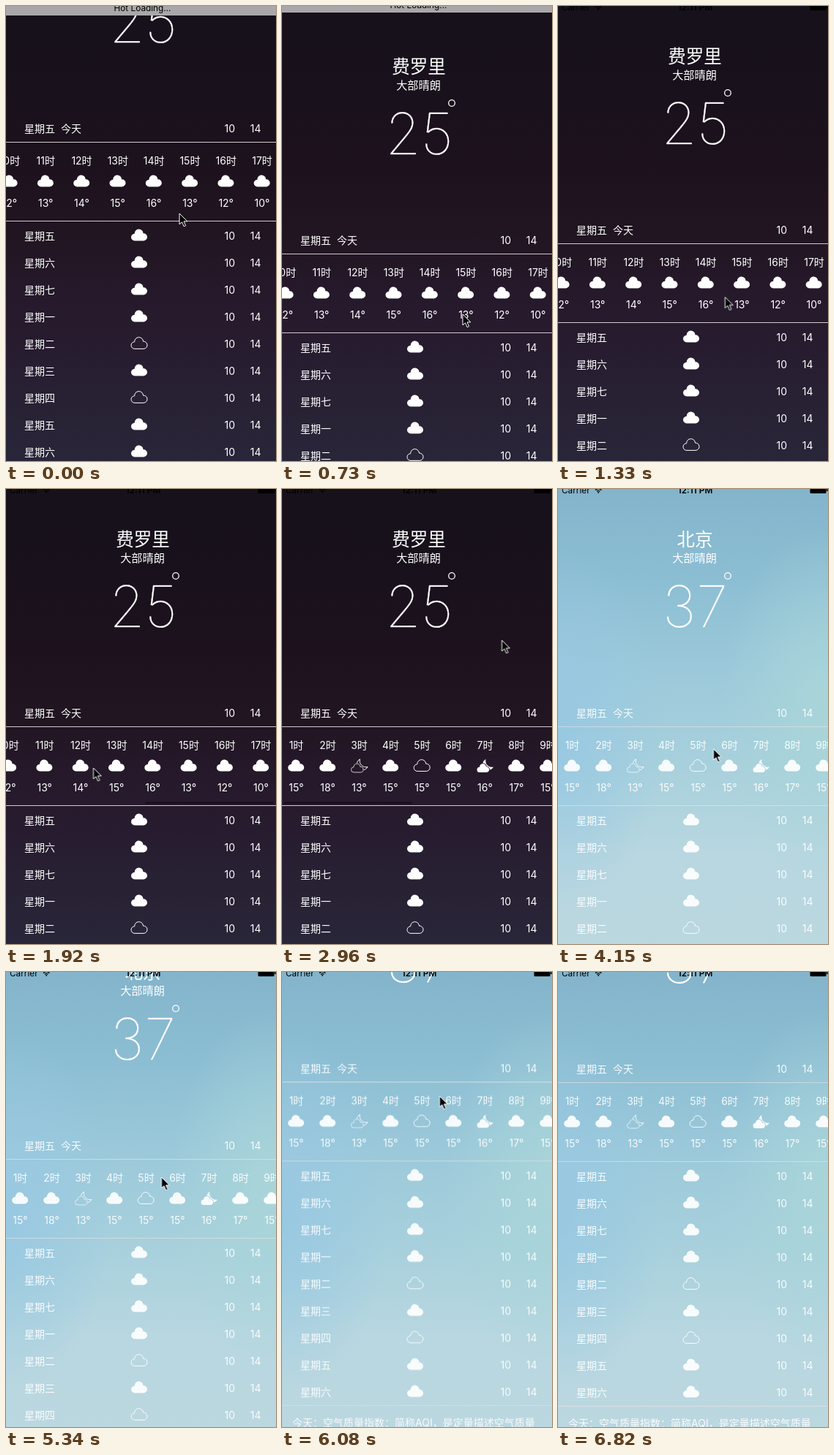
These frames come from a looping animation (369 px wide and 623 px high, 7.13 s). An HTML page:

```html
<!DOCTYPE html>
<html lang="zh-CN">
<head>
<meta charset="utf-8">
<title>天气</title>
<style>
html, body { margin: 0; width: 100%; height: 100%; overflow: hidden; background: #18111b; }
svg { display: block; }
text { font: 14px Inter, "Noto Sans CJK SC", "Noto Sans CJK", sans-serif; fill: #fff; white-space: pre; }
.mid { text-anchor: middle; }
.end { text-anchor: end; }
.city { font-size: 24.5px; }
.sky { font-size: 15.2px; }
.degrees { font-size: 78px; font-weight: 100; letter-spacing: 1px; stroke: #fff; stroke-width: .4px; }
.status text, .banner text { font-size: 11.8px; fill: #000; }
.status .clock { font-weight: 600; }
.line { stroke: #eae4e6; stroke-opacity: .88; }
.light .line { stroke-opacity: .62; }
.light .small { opacity: .92; }
.solid { fill: #fff; }
.outline { fill: none; stroke: #fff; stroke-width: 1; }

/* One animation second is one step of the choppy clock; --step is set by the script. */
.track, .dark .scroll, .light .scroll, .dark .hours, .dark .thumb, .banner, .cursor {
  animation: 48s linear calc(var(--step, 0) * -1s) infinite paused;
}
.track { animation-name: swipe; }
.dark .scroll { animation-name: pull; }
.light .scroll { animation-name: push; }
.dark .hours { animation-name: hours; }
.dark .thumb { animation-name: thumb; }
.banner { animation-name: banner; }
.cursor { animation-name: cursor; }

@keyframes swipe {
  0%, 42.71% { transform: translateX(0); animation-timing-function: ease-in-out; }
  52.08%, 100% { transform: translateX(-369px); }
}
@keyframes pull {
  0% { transform: translateY(-139px); animation-timing-function: cubic-bezier(.35, .2, .6, 1); }
  10.417% { transform: translateY(14px); animation-timing-function: ease-out; }
  16.67%, 100% { transform: translateY(0); }
}
@keyframes push {
  0%, 58.333% { transform: translateY(0); animation-timing-function: ease-in-out; }
  66.67%, 72.92% { transform: translateY(-62px); }
  75% { transform: translateY(-69px); animation-timing-function: ease-in-out; }
  88% { transform: translateY(-184px); animation-timing-function: ease-out; }
  95.83%, 100% { transform: translateY(-174px); }
}
@keyframes hours {
  0%, 25% { transform: translateX(-404.5px); }
  27.083% { transform: translateX(-406px); animation-timing-function: ease-in-out; }
  39.58%, 100% { transform: translateX(0); }
}
@keyframes thumb {
  0%, 22.9% { transform: translateX(190px); opacity: 0; }
  25% { transform: translateX(190px); opacity: 1; }
  27.083% { transform: translateX(190px); opacity: 1; animation-timing-function: ease-in-out; }
  39.58%, 41.67% { transform: translateX(2px); opacity: 1; }
  43.75%, 100% { transform: translateX(2px); opacity: 0; }
}
@keyframes banner {
  0%, 8.333% { transform: translateY(0); }
  10.417% { transform: translateY(-4px); }
  12.5%, 100% { transform: translateY(-22px); }
}
@keyframes cursor {
  0% { transform: translate(237px, 284px); animation-timing-function: ease-in-out; }
  10.417% { transform: translate(247px, 422px); }
  16.67% { transform: translate(238px, 400px); animation-timing-function: ease-in-out; }
  27.083% { transform: translate(119.5px, 382px); animation-timing-function: ease-in-out; }
  35.42% { transform: translate(290px, 374px); animation-timing-function: ease-in-out; }
  41.67% { transform: translate(300.5px, 207px); animation-timing-function: ease-in-out; }
  50% { transform: translate(105px, 215px); }
  52.08%, 54.17% { transform: translate(95px, 218px); }
  58.333% { transform: translate(212.5px, 356px); animation-timing-function: ease-in-out; }
  66.67%, 72.92% { transform: translate(212.5px, 288px); }
  75% { transform: translate(212.5px, 281px); animation-timing-function: ease-in-out; }
  85.4% { transform: translate(215px, 170px); }
  93.75%, 100% { transform: translate(390px, 120px); }
}
</style>
</head>
<body>
<svg id="stage" width="369" height="623" viewBox="0 0 369 623">
  <defs>
    <linearGradient id="night" x2="0" y2="1">
      <stop offset="0" stop-color="#16111b"/>
      <stop offset=".2" stop-color="#19111c"/>
      <stop offset=".38" stop-color="#1d121e"/>
      <stop offset=".5" stop-color="#211521"/>
      <stop offset=".6" stop-color="#241829"/>
      <stop offset=".72" stop-color="#271b2e"/>
      <stop offset=".85" stop-color="#282033"/>
      <stop offset="1" stop-color="#292639"/>
    </linearGradient>
    <linearGradient id="day" x2="0" y2="1">
      <stop offset="0" stop-color="#83b4cb"/>
      <stop offset=".2" stop-color="#8cbed3"/>
      <stop offset=".4" stop-color="#9cc9da"/>
      <stop offset=".6" stop-color="#a7d0dc"/>
      <stop offset=".8" stop-color="#b8d7e0"/>
      <stop offset="1" stop-color="#bbd7e0"/>
    </linearGradient>
    <radialGradient id="blue" cx="0" cy=".53" r=".4">
      <stop offset="0" stop-color="#98c8e2"/>
      <stop offset="1" stop-color="#98c8e2" stop-opacity="0"/>
    </radialGradient>
    <radialGradient id="teal" cx="1" cy=".48" r=".4">
      <stop offset="0" stop-color="#a9d5d9"/>
      <stop offset="1" stop-color="#a9d5d9" stop-opacity="0"/>
    </radialGradient>
    <path id="cloud" d="M-6.4 7.4a4.8 4.8 0 0 1-.2-9.6A5.9 5.9 0 0 1 5.2-2.8 5.1 5.1 0 0 1 6 7.4z"/>
    <path id="crescent" d="M1-9A8.6 8.6 0 0 0 11.5 1.5 7.8 7.8 0 1 1 1-9z"/>
    <use id="puff" href="#cloud" transform="translate(-2.5 3.4) scale(.75)"/>
    <mask id="behind" maskUnits="userSpaceOnUse" x="-15" y="-15" width="30" height="30">
      <rect x="-15" y="-15" width="30" height="30" fill="#fff"/>
      <use href="#puff" fill="#000" stroke="#000" stroke-width="2.4"/>
    </mask>
    <g id="moon"><g mask="url(#behind)"><use href="#crescent"/></g><use href="#puff"/></g>
  </defs>
</svg>
<script>
const text = (x, y, value, cls = '') => `<text x="${x}" y="${y}" class="${cls}">${value}</text>`;
const icon = (x, y, shape, style) => `<use href="#${shape}" x="${x}" y="${y}" class="${style}"/>`;
const line = y => `<path class="line" d="M0 ${y}H369"/>`;
const range = y => text(313, y, 10, 'end') + text(348.5, y, 14, 'end');

const temps = [15, 18, 13, 15, 15, 15, 16, 17, 15, 12, 13, 14, 15, 16, 13, 12, 10];
const icons = { 3: ['moon', 'outline'], 5: ['cloud', 'outline'], 7: ['moon', 'solid'] };

const hour = (temp, i) => {
  const n = i + 1;
  const x = n < 10 ? 19.5 + 43 * i : 409.4 + 49.3 * (n - 10);
  const [shape, style] = icons[n] || ['cloud', 'solid'];
  return text(x, 356, n + '时', 'mid') + icon(x, 379, shape, style)
    + text(x, 414, temp + '°', 'mid');
};

const day = (name, i) => {
  const y = 454 + 37 * i;
  const style = '二四'.includes(name) ? 'outline' : 'solid';
  return text(25, y + 5, '星期' + name) + icon(182.3, y - 1, 'cloud', style) + range(y + 4.7);
};

const page = (theme, x, fills, city, degrees) => `
  <svg class="${theme}" x="${x}" width="369" height="623">
    ${fills.map(f => `<rect width="369" height="623" fill="url(#${f})"/>`).join('')}
    <g class="scroll">
      ${text(187, 77.5, city, 'mid city')}${text(186.5, 99.5, '大部晴朗', 'mid sky')}
      ${text(188, 189, degrees, 'mid degrees')}
      <circle class="outline" cx="232" cy="119" r="4.3" style="stroke-width:1.3"/>
      <g class="small">
        ${text(25, 312, '星期五')}${text(75, 312, '今天')}${range(311.7)}
        <g class="hours">${temps.map(hour).join('')}</g>
        ${[...'五六七一二三四五六'].map(day).join('')}
        ${text(14, 797, '今天：空气质量指数：简称AQI，是定量描述空气质量')}
      </g>
      ${theme === 'dark' ? '<rect class="thumb" y="428.5" width="176" height="2.5" rx="1.2" fill-opacity=".4"/>' : ''}
      ${line(325.5)}${line(433.5)}${line(768.5)}
    </g>
  </svg>`;

stage.insertAdjacentHTML('beforeend', `
  <g class="track">
    ${page('dark', 0, ['night'], '费罗里', 25)}
    ${page('light', 369, ['day', 'blue', 'teal'], '北京', 37)}
  </g>
  <g class="status">
    ${text(5, 6, 'Carrier')}${text(187.5, 6, '12:11 PM', 'mid clock')}
    <path d="M51 1.4q4.2-3.6 8.4 0M53 3.3q2.2-1.8 4.4 0" fill="none" stroke="#000" stroke-width="1.3"/>
    <circle cx="55.2" cy="4.8" r="1"/>
    <rect x="344.5" y="-4" width="22" height="10" rx="1.5"/><rect x="367" y="-1" width="1.5" height="4"/>
  </g>
  <g class="banner">
    <rect y="-10" width="369" height="23" fill="#a9a7a9"/>
    ${text(186.5, 7, 'Hot Loading...', 'mid')}
  </g>
  <path class="cursor" d="M0 0v15l3.5-3.2 2.6 6 2.5-1.1-2.6-5.8h4.8z" stroke="#fff"/>`);

const LOOP = 7130, STEP = 148.3, LAST = 46;
const start = performance.now();
function tick() {
  const t = (performance.now() - start) % LOOP;
  const step = Math.min(LAST, Math.floor((t + 12) / STEP));
  document.documentElement.style.setProperty('--step', step);
  requestAnimationFrame(tick);
}
tick();
</script>
</body>
</html>
```
